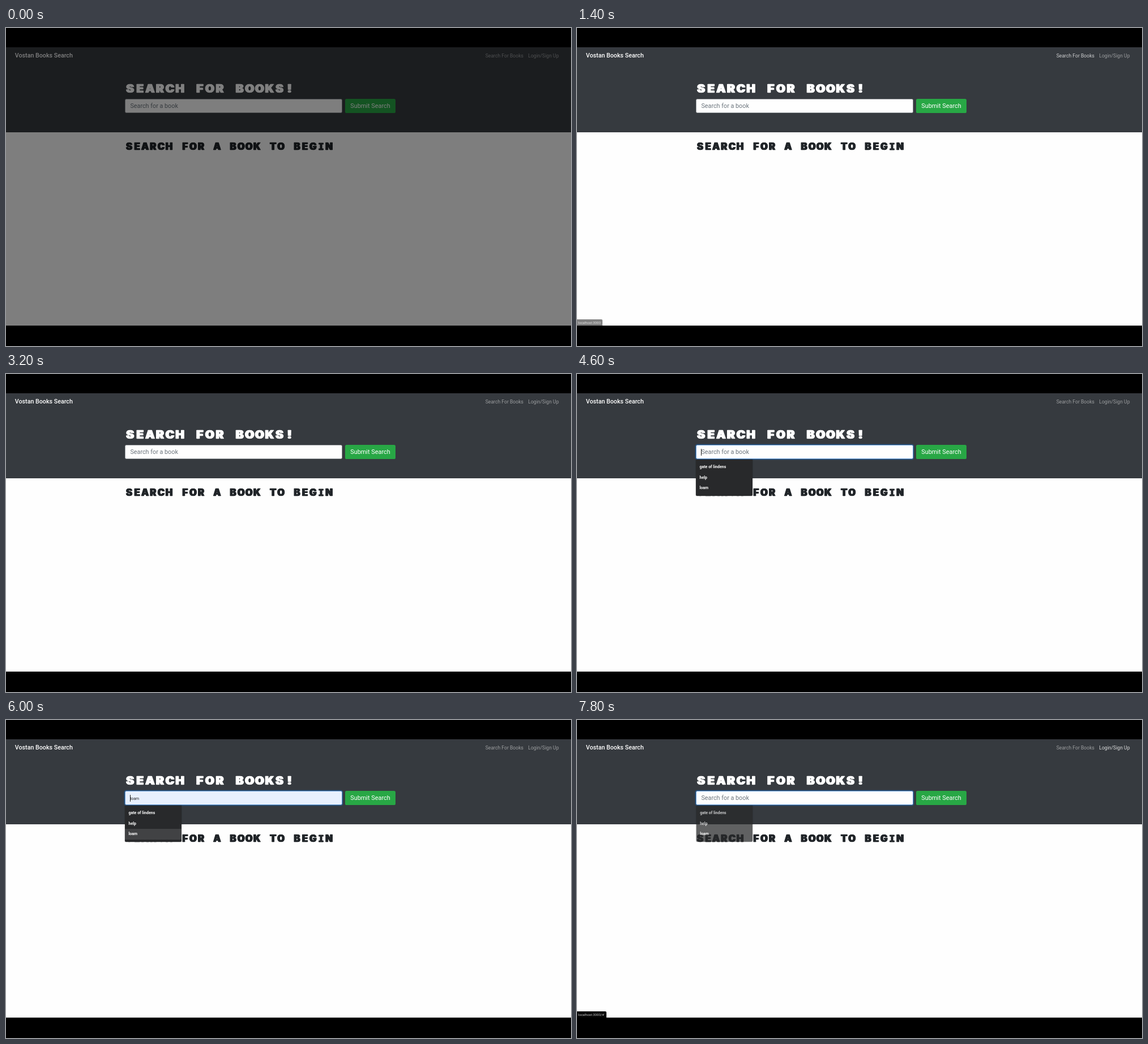
An HTML page that plays this animation: 998 px wide and 561 px high, repeating every 8 s.

```html
<!DOCTYPE html>
<html lang="en">
<head>
<meta charset="utf-8">
<title>Book search</title>
<style>
html, body { margin: 0; width: 100%; height: 100%; overflow: hidden; background: #000; }
#stage { position: absolute; left: 0; top: 0; width: 998px; height: 561px; overflow: hidden;
  background: #000; font: 10.8px/14px Roboto, sans-serif; }
#stage div { position: absolute; box-sizing: border-box; white-space: nowrap; }
#page { left: 0; top: 34px; width: 998px; height: 491px; background: #fefefe; overflow: hidden; }
#head { left: 0; top: 0; width: 998px; height: 150px; background: #363a3f; }
#shade { inset: 0; background: rgba(0, 0, 0, .5); animation: shade 8s step-end infinite; }

#brand { left: 15.8px; top: 8px; color: #fff; font-size: 10.7px; font-weight: 500; }
.link { top: 8px; font-size: 8.65px; color: #9b9d9f; }
#books { left: 846.7px; animation: books 8s step-end infinite; }
#login { left: 922.3px; animation: login 8s step-end infinite; }

/* Side shadows thicken the letters sideways only, for a broad slab look. */
.title { display: flex; left: 210.4px; font: 900 20.8px/30px Inter, sans-serif;
  -webkit-text-stroke: .5px; text-shadow: .045em 0, -.045em 0; }
.title i { flex: 0 0 var(--cell); display: flex; justify-content: center; font-style: normal; }
.title .slab { font-family: "DejaVu Sans Mono", monospace; font-weight: 700; -webkit-text-stroke: 1px; }
#big { --cell: 17.6px; top: 58.4px; color: #fff; }
#small { --cell: 14.13px; top: 160px; font-size: 16.7px; color: #212529; }

#field { left: 210px; top: 91px; width: 384px; height: 25px; border: 1px solid #9a9ea2;
  border-radius: 2.6px; background: #fefefe; animation: focus 8s step-end infinite, fill 8s step-end infinite; }
#hint { left: 219.4px; top: 97.2px; color: #6c757d; animation: hint 8s step-end infinite; }
.typed { left: 219.6px; top: 98px; font-size: 7px; color: #222; opacity: 0; }
#caret { left: 219px; top: 97.5px; width: 1px; height: 12.5px; background: #222; opacity: 0;
  animation: caret 8s step-end infinite; }
#submit { left: 599px; top: 91px; width: 89px; height: 25px; border-radius: 2.6px; background: #28a745;
  color: #fff; font-size: 10.9px; line-height: 25px; text-align: center; }

#menu { left: 210px; top: 117px; width: 100px; height: 64px; border-radius: 0 0 2px 2px; background: #28292b;
  box-shadow: 0 0 1.5px rgba(0, 0, 0, .6); opacity: 0; animation: menu 8s step-end infinite; }
.row { left: 0; width: 100%; height: 18.7px; padding-left: 6.5px; color: #fff; font-size: 7px;
  font-weight: 700; line-height: 19.4px; }
.pick2 { animation: pick2 8s step-end infinite; }
.pick3 { animation: pick3 8s step-end infinite; }
#typed2 { animation: show2 8s step-end infinite; }
#typed3 { animation: show3 8s step-end infinite; }

.status { left: 0; bottom: 0; height: 11px; padding-left: 2px; border-radius: 0 2px 0 0; background: #050505;
  color: #c8c8c8; font-size: 6.05px; line-height: 11.5px; opacity: 0; }
#status1 { width: 45px; animation: status1 8s step-end infinite; }
#status2 { width: 51.6px; animation: status2 8s step-end infinite; }

@keyframes shade { 0% { opacity: 1 } 2.5%, 100% { opacity: 0 } }
@keyframes books { 0%, 20%, 100% { color: #9b9d9f } 12.5% { color: #cdcecf } }
@keyframes login { 0% { color: #9b9d9f } 90%, 100% { color: #dcdddd } }
@keyframes focus {
  0% { border-color: #9a9ea2; box-shadow: none }
  45%, 100% { border-color: #6a9fd8; box-shadow: 0 0 0 1.6px rgba(0, 123, 255, .25) }
}
@keyframes fill { 0%, 82.5%, 100% { background: #fefefe } 75% { background: #e8f0fe } }
@keyframes hint { 0%, 82.5%, 100% { opacity: 1 } 72.5% { opacity: 0 } }
@keyframes caret {
  0%, 50%, 62.5%, 90%, 100% { opacity: 0 }
  42.5%, 57.5%, 70% { opacity: 1 }
}
@keyframes menu {
  0% { opacity: 0; transform: none }
  45% { opacity: 1; transform: none }
  97.5%, 100% { opacity: .74; transform: translateX(.4px) scale(.993) }
}
@keyframes pick2 { 0%, 75%, 100% { background: transparent } 72.5% { background: #414244 } }
@keyframes pick3 { 0%, 82.5%, 100% { background: transparent } 75% { background: #414244 } }
@keyframes show2 { 0%, 75%, 100% { opacity: 0 } 72.5% { opacity: 1 } }
@keyframes show3 { 0%, 82.5%, 100% { opacity: 0 } 75% { opacity: 1 } }
@keyframes status1 {
  0%, 40%, 100% { opacity: 0 }
  17.5% { opacity: .5 }
  20% { opacity: 1 }
  22.5% { opacity: .55 }
  25% { opacity: .03 }
}
@keyframes status2 { 0% { opacity: 0 } 95% { opacity: .5 } 97.5%, 100% { opacity: 1 } }
</style>
</head>
<body>
<div id="stage">
  <div id="page">
    <div id="head"></div>
    <div id="brand">Vostan Books Search</div>
    <div id="books" class="link">Search For Books</div>
    <div id="login" class="link">Login/Sign Up</div>
    <div id="big" class="title">SEARCH FOR BOOKS!</div>
    <div id="small" class="title">SEARCH FOR A BOOK TO BEGIN</div>
    <div id="field"></div>
    <div id="hint">Search for a book</div>
    <div id="typed2" class="typed">help</div>
    <div id="typed3" class="typed">loam</div>
    <div id="caret"></div>
    <div id="submit">Submit Search</div>
    <div id="menu">
      <div class="row" style="top:4px">gate of lindens</div>
      <div class="row pick2" style="top:22.7px">help</div>
      <div class="row pick3" style="top:41.4px">loam</div>
    </div>
    <div id="status1" class="status">localhost:3000</div>
    <div id="status2" class="status">localhost:3000/#</div>
    <div id="shade"></div>
  </div>
</div>
<script>
// Set each title letter in an equal cell, like a monospaced face.
for (const title of document.querySelectorAll('.title')) {
  const cells = [...title.textContent].map(letter => {
    const cell = document.createElement('i');
    cell.textContent = letter;
    if (letter === 'I') cell.className = 'slab';
    return cell;
  });
  title.replaceChildren(...cells);
}
</script>
</body>
</html>
```
